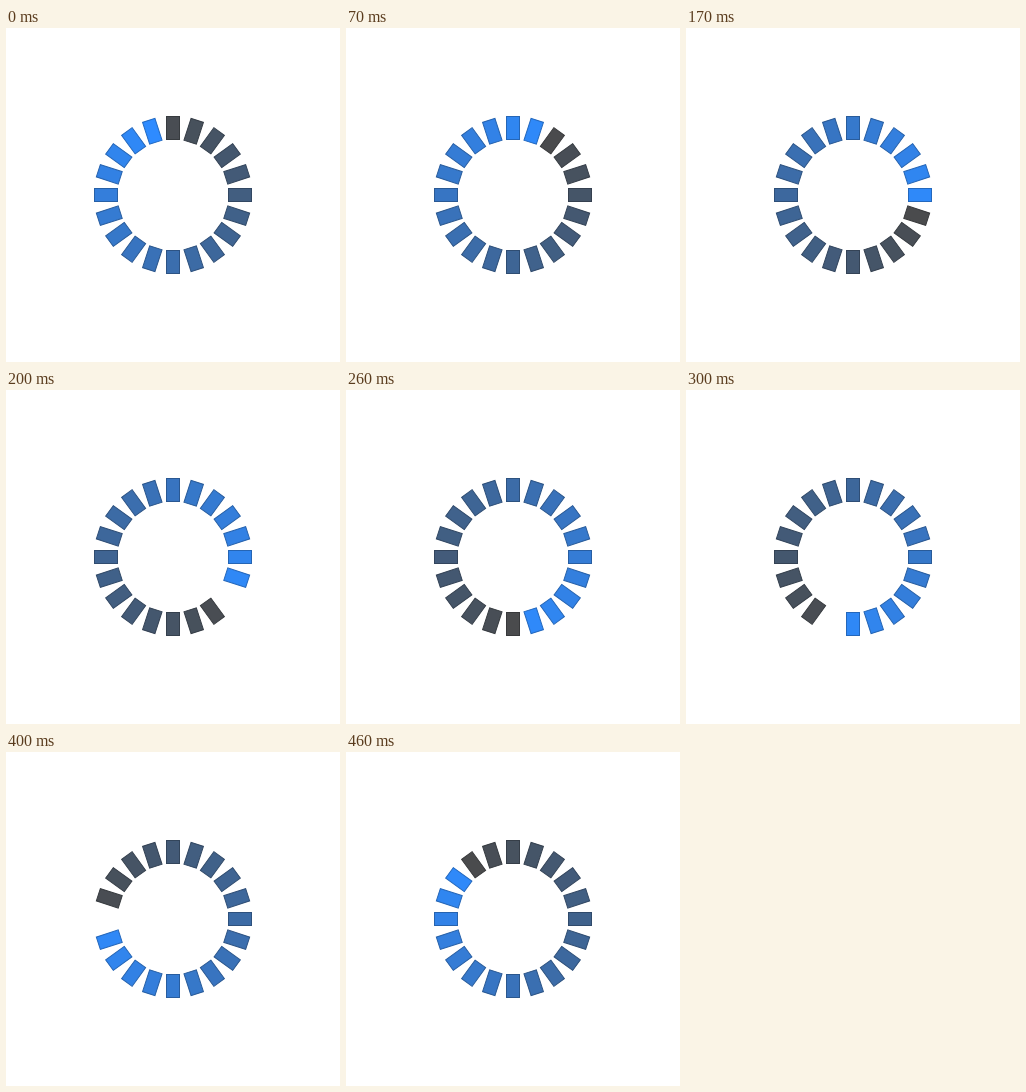
An HTML page for the animation above (500 ms loop, 334 by 334 pixels).

```html
<!DOCTYPE html>
<html lang="en">
<head>
<meta charset="utf-8">
<title>Spinner</title>
<style>
html, body { margin: 0; width: 100%; height: 100%; overflow: hidden; background: #fff; }
svg { display: block; width: 334px; height: 334px; }
</style>
</head>
<body>
<svg id="stage" viewBox="0 0 334 334"></svg>
<script>
const BARS = 20, STEPS = 15, LOOP = 500, CENTER = 167;
const HEAD = [46, 139, 255], TAIL = [74, 74, 74];
// Steps last 30 ms, except these, which last 40 ms
const LONG = [1, 4, 8, 11, 14];
const stage = document.getElementById('stage');

const bars = Array.from({ length: BARS }, (_, i) => {
  const bar = document.createElementNS('http://www.w3.org/2000/svg', 'rect');
  const attrs = {
    x: 160.5, y: 88.5, width: 13, height: 23, 'stroke-width': 1,
    transform: `rotate(${i * 360 / BARS} ${CENTER} ${CENTER})`
  };
  for (const name in attrs) bar.setAttribute(name, attrs[name]);
  return stage.appendChild(bar);
});

function stepAt(ms) {
  let end = 0;
  for (let k = 0; k < STEPS; k++) {
    end += LONG.includes(k) ? 40 : 30;
    if (ms < end) return k;
  }
  return STEPS - 1;
}

function shade(age, light) {
  const mix = HEAD.map((c, i) => Math.round((c + (TAIL[i] - c) * age) * light));
  return `rgb(${mix.join(',')})`;
}

function draw(ms) {
  const step = stepAt(ms % LOOP);
  // Ages counted in thirds of a bar, so they stay whole numbers
  const span = BARS * 3;
  bars.forEach((bar, i) => {
    const thirds = (step * 4 - (i + 1) * 3 + span) % span;
    const age = thirds / span;
    // A bar blinks out on the exact moment its colour restarts
    const hidden = thirds === 0 && step > 0;
    bar.setAttribute('visibility', hidden ? 'hidden' : 'visible');
    bar.setAttribute('fill', shade(age, 1));
    bar.setAttribute('stroke', shade(age, 0.76));
  });
}

const start = performance.now();
function tick() {
  draw(performance.now() - start);
  requestAnimationFrame(tick);
}
draw(0);
requestAnimationFrame(tick);
</script>
</body>
</html>
```
